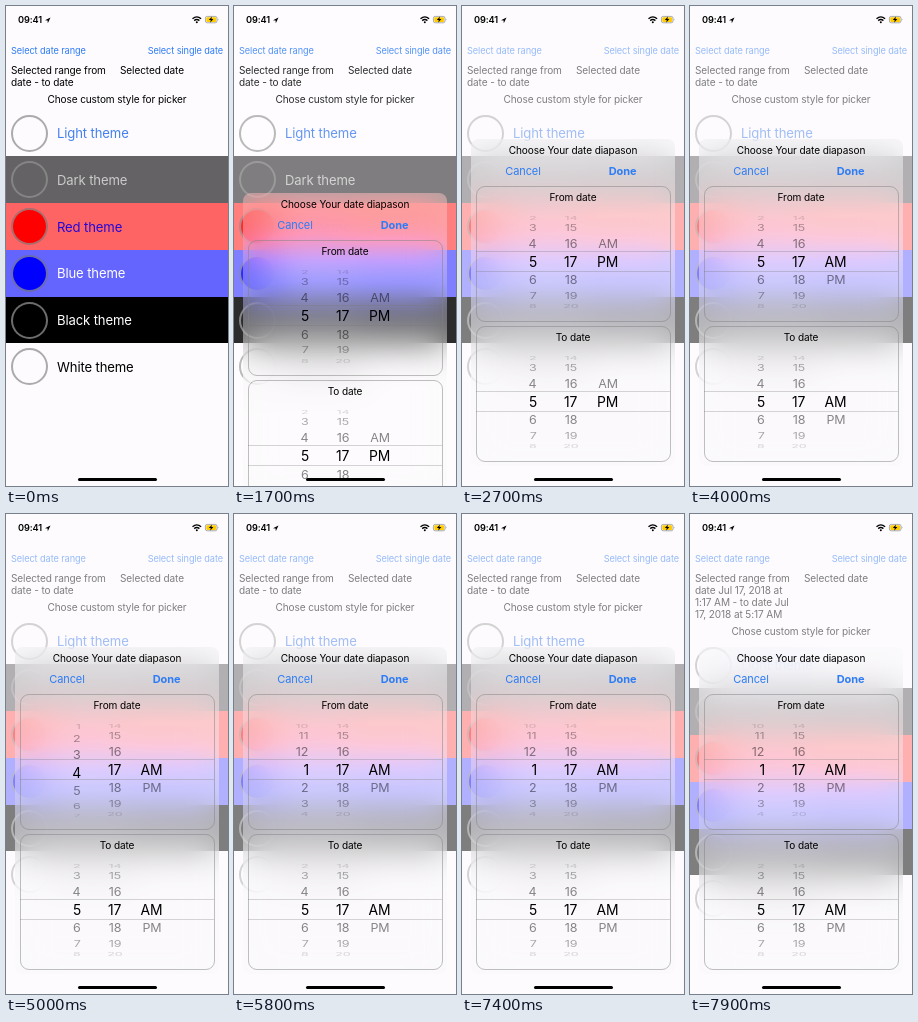
An HTML page for the animation above (8 s loop, 222 by 480 pixels).

```html
<!DOCTYPE html>
<html lang="en">
<head>
<meta charset="utf-8">
<style>
html, body { margin: 0; width: 100%; height: 100%; overflow: hidden; background: #fdfbfe; }
body { position: relative; font-family: Inter, sans-serif; letter-spacing: -.01em; color: #000; }
div, svg { position: absolute; }
#stage { width: 222px; height: 480px; overflow: hidden; background: #fdfbfe; }
.text { white-space: pre; line-height: 12px; }
.row { left: 0; width: 222px; height: 46.75px; }
.row i { position: absolute; left: 5px; top: 5px; width: 33px; height: 33px; border: 2px solid rgba(145,145,145,.75); border-radius: 50%; }
#veil { width: 222px; height: 480px; background: #fdfbfe; }
#sheet { left: 9px; width: 204px; height: 327px; border-radius: 8px; backdrop-filter: blur(18px) saturate(1.5); }
#panel { left: 0; width: 222px; height: 327px; }
.card { left: 14px; width: 193px; height: 134px; border: 1px solid rgba(130,130,130,.5); border-radius: 9px; }
.line { left: 14px; width: 194px; height: 1px; background: rgba(120,120,120,.3); }
</style>
</head>
<body>
<div id="stage">
  <div id="page"></div>
  <div id="veil"></div>
  <div id="sheet"></div>
  <div id="panel"></div>
  <svg width="222" height="480">
    <path d="M39 14.3 44.5 11.5 41.8 17.2 41.6 14.5Z"/>
    <g fill="none" stroke="#000" stroke-width="1.4">
      <path d="M186.5 12.7q4.3-3.6 8.6 0M188.2 14.6q2.6-2.1 5.2 0"/>
      <rect x="199.4" y="10.4" width="11.6" height="6.4" rx="1.8" stroke="#888" stroke-width=".7"/>
    </g>
    <circle cx="190.8" cy="16.2" r="1"/>
    <rect x="200.3" y="11.3" width="9.8" height="4.6" rx="1" fill="#fc0"/>
    <path d="M206 10.6 202.8 14h2l-.7 2.8 3.3-3.7h-2Z"/>
    <path d="M211.8 12.5v2.2q1.4-1.1 0-2.2" fill="#888"/>
    <rect x="72" y="472" width="79" height="3" rx="1.5"/>
  </svg>
  <div id="status"></div>
</div>
<script>
const LOOP = 8000, STEP = 100, SHEET_TOP = 133, BLUE = '#2e7cf6', BODY = 10.06;
const ROW_TOP = 103.5, ROW_HEIGHT = 46.75;
const TILT = Math.PI / 8, RADIUS = 48;
const $ = id => document.getElementById(id);

function add(parent, className, style = {}) {
  const el = document.createElement('div');
  el.className = className;
  Object.assign(el.style, style);
  parent.append(el);
  return el;
}

// anchor: 0 = left, .5 = centre, 1 = right; y is the middle of the first line
function text(parent, string, x, y, size = BODY, color = '#000', anchor = 0, weight = 400) {
  const el = add(parent, 'text', {
    left: x + 'px', top: y - 6 + 'px', fontSize: size + 'px', color, fontWeight: weight,
    letterSpacing: 'inherit', transform: `translateX(${-anchor * 100}%)`
  });
  el.style.letterSpacing = '-.01em';
  el.textContent = string;
  return el;
}

// Page
const page = $('page'), panel = $('panel');
text($('status'), '09:41', 12, 14, 9.2, '#000', 0, 600);
text(page, 'Select date range', 5, 45, 9.2, BLUE);
text(page, 'Select single date', 217, 45, 9.2, BLUE, 1);
const range = text(page, '', 5, 64);
text(page, 'Selected date', 114, 64);

const list = add(page, '');
text(list, 'Chose custom style for picker', 111, 93, BODY, '#000', .5);
[
  ['Light', 'transparent', 'transparent', '#4480ee'],
  ['Dark', '#646264', '#646264', '#cbcbcb'],
  ['Red', '#ff6464', '#f00', '#2408d8'],
  ['Blue', '#6464ff', '#00f', '#fff'],
  ['Black', '#000', '#000', '#fff'],
  ['White', 'transparent', 'transparent', '#000']
].forEach(([name, background, fill, color], i) => {
  const row = add(list, 'row', { top: ROW_TOP + i * ROW_HEIGHT + 'px', background });
  row.append(document.createElement('i'));
  row.firstChild.style.background = fill;
  text(row, name + ' theme', 51, 23.5, 13.1, color);
});

// Sheet content, relative to the sheet's top
text(panel, 'Choose Your date diapason', 111, 11, BODY, '#000', .5);
text(panel, 'Cancel', 61, 31.5, 11, BLUE, .5);
text(panel, 'Done', 160.5, 31.5, 11, BLUE, .5, 700);

function wheel(x, middle, anchor, label) {
  const cells = Array.from({ length: 7 }, () => text(panel, '', x, 0, 13.9));
  return value => cells.forEach((cell, n) => {
    const index = Math.round(value) + n - 3, d = index - value;
    const flat = Math.max(0, Math.cos(d * TILT)), chosen = Math.abs(d) < .5;
    const scale = chosen ? 1 : .9;
    cell.textContent = label(index);
    cell.style.top = middle - 6 + RADIUS * Math.sin(d * TILT) + 'px';
    cell.style.opacity = chosen ? 1 : .52 * flat ** 1.3;
    cell.style.transform = `translateX(${-anchor * 100}%) scale(${scale}, ${scale * flat})`;
  });
}

function picker(title, top) {
  add(panel, 'card', { top: top + 'px' });
  text(panel, title, 111, top + 11, BODY, '#000', .5);
  for (const y of [65, 85]) add(panel, 'line', { top: top + y + 'px' });
  const middle = top + 76;
  return {
    hour: wheel(75, middle, 1, i => (i + 11) % 12 + 1),
    minute: wheel(108.5, middle, .5, i => i),
    half: wheel(145.5, middle, .5, i => ['AM', 'PM'][i] || '')
  };
}
const from = picker('From date', 47), to = picker('To date', 187);
from.minute(17);
to.minute(17);
to.hour(5);

function ease(t, start, end) {
  const u = Math.min(1, Math.max(0, (t - start) / (end - start)));
  return (1 - Math.cos(Math.PI * u)) / 2;
}

function render(t) {
  const slide = ease(t, 1300, 1840), fade = ease(t, 1500, 2000), done = t >= 7900;
  const top = SHEET_TOP + 347 * (1 - slide) + 'px';
  $('sheet').style.top = panel.style.top = top;
  $('sheet').style.background = `rgba(248,247,249,${.25 + .15 * fade})`;
  $('veil').style.opacity = .5 * fade;
  to.half(1 - ease(t, 2750, 3250));
  from.half(1 - ease(t, 3250, 3700));
  from.hour(5 - 4 * ease(t, 4700, 5520));
  range.textContent = done
    ? 'Selected range from\ndate Jul 17, 2018 at\n1:17 AM - to date Jul\n17, 2018 at 5:17 AM'
    : 'Selected range from\ndate - to date';
  list.style.top = done ? '24px' : 0;
}

// The picture advances ten times a second
function tick() {
  const t = performance.now() % LOOP;
  render(Math.floor(t / STEP) * STEP);
  requestAnimationFrame(tick);
}
tick();
</script>
</body>
</html>
```
